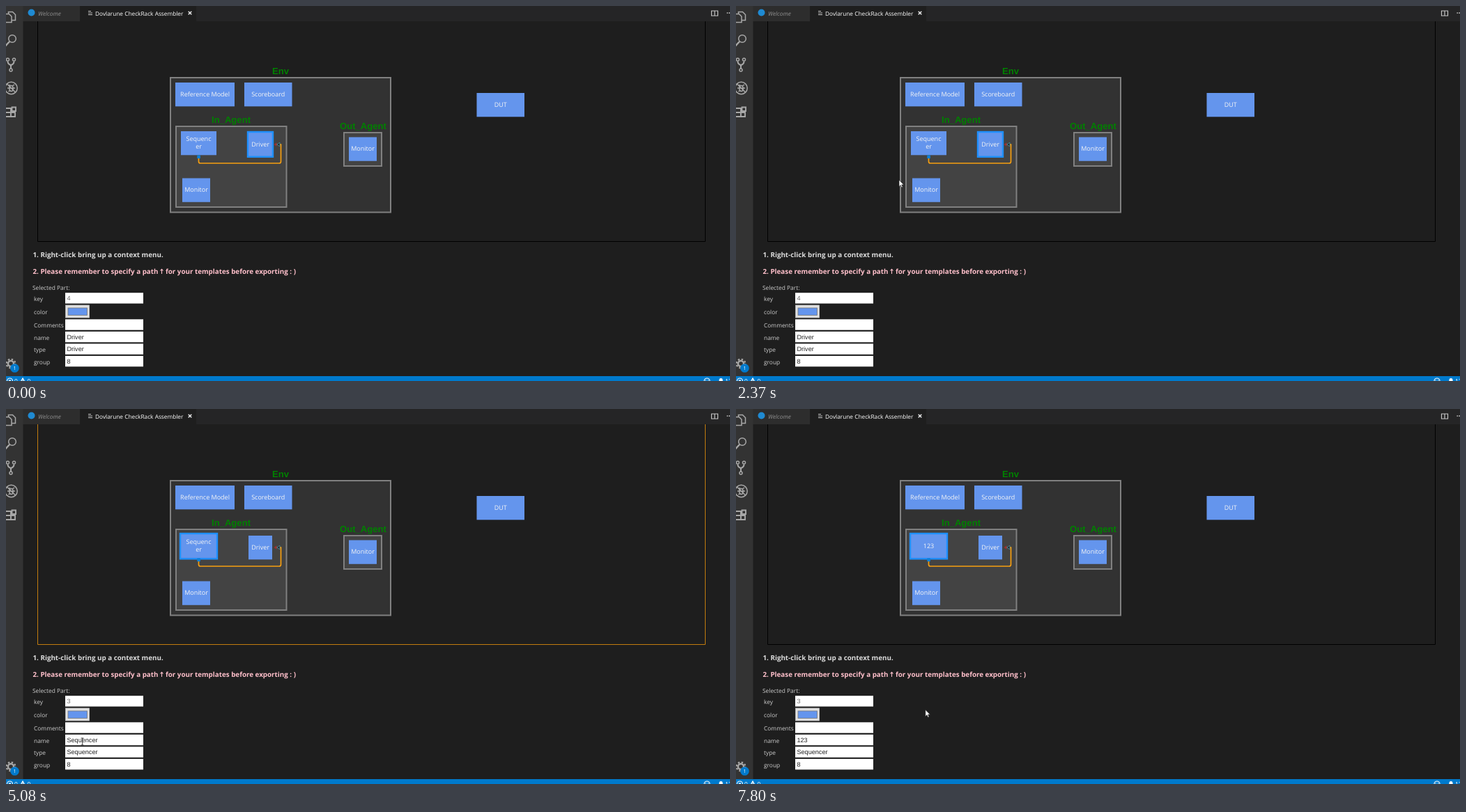
Recreate the animation shown at these times as an HTML page. Size 1039x539 px, loop 8000 ms.

```html
<!DOCTYPE html>
<html lang="en">
<head>
<meta charset="utf-8">
<title>Testbench editor</title>
<style>
  html, body { margin: 0; width: 100%; height: 100%; overflow: hidden; background: #1e1e1e; }
  svg { display: block; width: 100vw; height: 100vh; }
  text { font-family: "Open Sans", "Noto Sans", sans-serif; font-size: 8.4px; fill: #ccc; text-rendering: geometricPrecision; white-space: pre; }
  .tab { font-size: 8.3px; }
  .head { font-size: 9.8px; font-weight: 700; fill: #dcdcdc; }
  .pink { fill: #ffc0cb; }
  .node { font-size: 9px; fill: #f5f5f5; text-anchor: middle; }
  .title { font: 700 13.1px "Liberation Sans", Arial, sans-serif; fill: green; }
  .value { font: 9.1px "Liberation Sans", Arial, sans-serif; fill: #222; }
  .group { stroke: #808080; stroke-width: 2; }
  .block { fill: #6495ed; }
  .icon { fill: none; stroke: #a8a8a8; stroke-width: 1.5; }
  .status { fill: none; stroke: #fff; stroke-width: 1.2; }
</style>
</head>
<body>
<svg viewBox="0 0 1039 539" preserveAspectRatio="none">
  <defs><clipPath id="selClip"><rect id="selArea" y="470" height="11"/></clipPath></defs>
  <rect width="1039" height="539" fill="#1e1e1e"/>

  <!-- tabs -->
  <rect x="24" width="1015" height="22" fill="#252526"/>
  <rect x="24" width="82" height="22" fill="#2d2d2d"/>
  <rect x="106" width="167" height="22" fill="#1e1e1e"/>
  <circle cx="36.5" cy="9.5" r="5" fill="#1f8ad2"/>
  <text class="tab" x="46" y="13.7" font-style="italic" style="fill:#8f8f8f">Welcome</text>
  <path d="M118 7.5h4M118 10h6M118 12.5h6" stroke="#c5c5c5"/>
  <text class="tab" x="128" y="13.7" style="fill:#fff">Dovlarune CheckRack Assembler</text>
  <path d="M261.7 7.7l4.6 4.6m0-4.6l-4.6 4.6" stroke="#f0f0f0" stroke-width="1.4"/>
  <path d="M1012.5 7v7h9V7zM1017 7v7M1012 7h10" fill="none" stroke="#c5c5c5" stroke-width="1.2"/>
  <path d="M1034.5 10h1.6m1.2 0h1.7" stroke="#c5c5c5" stroke-width="1.7"/>

  <!-- activity bar -->
  <rect width="24.5" height="532" fill="#333"/>
  <g class="icon">
    <path d="M3.5 11V8.500h6l4 4v8H8M-2 11.500h6.500l3.500 3.500v8.500h-10z"/>
    <circle cx="9" cy="47" r="5.300"/><path d="M5.200 51L-1 57.500" stroke-width="2.400"/>
    <circle cx="2.500" cy="77" r="2"/><circle cx="11.500" cy="77" r="2"/><circle cx="7" cy="92" r="2"/>
    <path d="M2.500 79.500q0 4 4.500 5.500q4.500-1.500 4.500-5.500M7 85v5" stroke-width="2"/>
    <circle cx="7.500" cy="118" r="8.700"/><path d="M1.500 112l12 12M2 118h11M3.500 123l3-2M12 113l-3 2M5 113l1 2"/>
    <ellipse cx="7.500" cy="118.500" rx="2.700" ry="4"/>
    <path d="M-1 147h8v12h-8M-1 153h14v6H6M8.500 145.500h5.500v5.500H8.500z" stroke-width="1.900"/>
    <circle cx="7" cy="514" r="4" stroke-width="2.400"/>
    <circle cx="7" cy="514" r="6.300" stroke-width="2.200" stroke-dasharray="2.470 2.470"/>
  </g>
  <circle cx="12.500" cy="520.500" r="6.300" fill="#007acc"/>
  <text x="12.500" y="523.200" text-anchor="middle" style="font-size:7px;fill:#fff">1</text>

  <!-- status bar -->
  <rect y="532" width="1039" height="7" fill="#007acc"/>
  <g class="status">
    <circle cx="5.500" cy="539" r="4"/><path d="M4 537.500l3 3m0-3l-3 3M24 535l-4.500 8h9zM24 537.500v3"/>
    <circle cx="1006" cy="539" r="4"/><path d="M1004.300 537.300v1.200m3.400-1.200v1.200"/>
    <path d="M1022.500 541q1.500-1 1.500-3q0-2.500 2-2.500t2 2.500q0 2 1.500 3z" fill="#fff"/>
  </g>
  <g style="--c:#fff"><text x="12" y="542" style="fill:#fff">0</text><text x="30.500" y="542" style="fill:#fff">0</text><text x="1032" y="542" style="fill:#fff">12</text></g>

  <!-- diagram -->
  <path id="frame" d="M45.500 22V338.500H1003.500V22" fill="none"/>
  <rect class="group" x="236" y="103" width="316" height="193.500" fill="#323232"/>
  <rect class="group" x="244" y="173" width="158.500" height="116" fill="#434343"/>
  <rect class="group" x="485" y="182" width="54" height="48" fill="#434343"/>
  <text class="title" x="382" y="98.300">Env</text>
  <text class="title" x="295" y="168.300">In_Agent</text>
  <text class="title" x="479" y="177.300">Out_Agent</text>
  <g id="nodes"></g>
  <rect id="pick" fill="none" stroke="#1e90ff" stroke-width="2.400"/>
  <path d="M276.500 217V223.500q0 2.500 2.500 2.500H392q2.500 0 2.500-2.500V199H390" fill="none" stroke="#f8a010" stroke-width="1.700"/>
  <rect x="274.300" y="214.500" width="4.600" height="4.600" fill="#0a80d8"/>
  <path d="M384.500 199l4-2.700v5.400z" fill="#a03030"/>
  <path d="M388.500 199l4.500-2.700v5.400z" fill="#222" stroke="#4d9aa8" stroke-width=".8"/>

  <!-- notes and form -->
  <text class="head" x="38.500" y="360.500">1. Right-click bring up a context menu.</text>
  <text class="head pink" y="385.200"><tspan x="38.500">2. Please remember to specify a path</tspan><tspan x="229">for your templates before exporting : )</tspan></text>
  <path d="M223.500 385V378.500M221.500 380.500l2-2.200l2 2.200" fill="none" stroke="#ffc0cb" stroke-width="1.100"/>
  <text x="38" y="408.300">Selected Part:</text>
  <g id="form"></g>
  <rect id="button" x="85.500" y="430" width="34" height="18" stroke="#bbb" stroke-width=".8"/>
  <rect x="89" y="434" width="27.500" height="10.500" fill="#6495ed" stroke="#777" stroke-width=".8"/>
  <rect id="focus" x="85.500" y="468.300" width="111" height="14.700" fill="none" stroke="#f0a020" stroke-width="1.200"/>
  <rect id="mark" y="470" height="11" fill="#3390ff"/>
  <text id="picked" class="value" x="87.500" y="478.600" clip-path="url(#selClip)" style="fill:#fff"></text>
  <path id="caret" d="M0 470.500v10" stroke="#222" stroke-width=".8"/>

  <path id="arrow" d="M0 0V9.600L2.200 7.500L3.700 10.900L5.300 10.200L3.800 6.900H6.800Z" fill="#fff" stroke="#111" stroke-width=".6"/>
  <path id="beam" d="M-2 -5H2M0 -5V5M-2 5H2" fill="none" stroke="#222" stroke-width=".8"/>
</svg>
<script>
const $ = id => document.getElementById(id);
const set = (el, attrs) => { for (const k in attrs) el.setAttribute(k, attrs[k]); };
const show = (el, on) => { el.style.display = on ? "" : "none"; };

// label, x, y, width
const nodes = [
  ["Reference Model", 243, 110, 85], ["Scoreboard", 342, 110, 68.5],
  ["", 251, 180, 51], ["Driver", 348, 182, 34], ["Monitor", 253, 247.5, 40],
  ["Monitor", 492, 188.5, 40], ["DUT", 675.5, 125, 68.5]
];
$("nodes").innerHTML = nodes.map(([label, x, y, w]) =>
  `<rect class="block" x="${x}" y="${y}" width="${w}" height="34.300"/>
   <text class="node" x="${x + w / 2}" y="${y + 19.6}">${label}</text>`).join("") +
  `<text class="node" id="seqTop" x="276.500" y="194">Sequenc</text>
   <text class="node" id="seqEnd" x="276.500" y="205">er</text>
   <text class="node" id="seqNew" x="276.500" y="199.600">123</text>`;

// label, label baseline, box top
const rows = [["key", 423.700, 412.200], ["Comments", 462, 450.300], ["name", 479.500, 467.900],
  ["type", 497, 485.400], ["group", 514.500, 502.900]];
$("form").innerHTML = `<text x="40" y="442.700">color</text>` + rows.map(([label, base, top]) =>
  `<text x="40" y="${base}">${label}</text>
   <rect x="85" y="${top}" width="112" height="15.400" fill="#fff"/>
   <text class="value" id="${label}" x="87.500" y="${top + 10.7}"></text>`).join("");
$("key").style.fill = "#6a6a6a";
$("group").textContent = "8";

// start, end, number of steps, then [step, x, y] points on the pointer path
const moves = [
  [130, 900, 11, [1, 965, 528], [4, 640, 420], [7, 300, 380], [9, 150, 395], [11, 111, 421]],
  [990, 1380, 6, [2, 113, 428], [6, 109, 443]],
  [1610, 1690, 2, [2, 104, 442]],
  [1840, 2610, 11, [5, 200, 300], [9, 268, 200], [11, 266, 198]],
  [3070, 3840, 11, [1, 253.5, 319.500], [4, 180, 400], [8, 111, 437], [11, 107, 436]],
  [3910, 4530, 8, [3, 108, 432.500], [5, 110, 422], [8, 117, 460.500]],
  [4700, 4850, 3, [3, 109.500, 478]],
  [5000, 5770, 11, [2, 109.500, 478], [6, 136, 477], [8, 136, 477], [11, 128, 476]],
  [5850, 6150, 5, [5, 72, 474.800]],
  [6320, 7100, 11, [6, 152, 469], [11, 150, 474]],
  [7170, 7800, 9, [3, 200, 452], [7, 271.800, 432.300], [9, 271.800, 432.300]]
];

function pointer(t) {
  let pos = [985, 560];
  for (const [from, to, n, ...path] of moves) {
    if (t < from) break;
    const step = Math.min(n, Math.floor((t - from) / (to - from) * (n - 1) + .001) + 1);
    let s0 = 0, [x0, y0] = pos;
    for (const [s, x, y] of path) {
      const p = Math.min(1, (step - s0) / (s - s0));
      pos = [x0 + (x - x0) * p, y0 + (y - y0) * p];
      if (step <= s) break;
      [s0, x0, y0] = [s, x, y];
    }
  }
  return pos;
}

const PICK = 2450, PRESS = 5460, RELEASE = 6150, TYPE = [6860, 6940, 7020], COMMIT = 7720;

function draw(t) {
  const [x, y] = pointer(t);
  const within = (l, top, r, b) => x >= l && x <= r && y >= top && y <= b;
  const beam = within(85, 450, 197, 466) || within(85, 467, 197, 483);
  set($("arrow"), { transform: `translate(${x} ${y})` });
  set($("beam"), { transform: `translate(${x} ${y})` });
  show($("arrow"), !beam);
  show($("beam"), beam);
  set($("button"), { fill: within(85, 430, 119, 448) ? "#f0f0f0" : "#e1e1e1" });

  const seq = t >= PICK, canvasFocus = seq && t < PRESS;
  set($("frame"), { stroke: canvasFocus ? "#c27c0e" : "#000" });
  set($("pick"), seq ? { x: 250, y: 179, width: 53, height: 36.3 } : { x: 347, y: 181, width: 36, height: 35.8 });

  const typed = TYPE.filter(k => t >= k).length;
  const part = seq ? "Sequencer" : "Driver";
  const name = typed ? "123".slice(0, typed) : part;
  $("key").textContent = seq ? "3" : "4";
  $("type").textContent = part;
  $("name").textContent = $("picked").textContent = name;

  const focus = t >= PRESS && t < COMMIT;
  show($("focus"), focus);
  const end = 87.5 + $("name").getComputedTextLength();
  let start = end;
  if (focus && !typed) {
    const edge = t >= RELEASE ? 0 : x;
    for (let i = name.length - 1; i >= 0; i--) {
      const { x: left } = $("name").getStartPositionOfChar(i);
      if (edge < left + 2) start = left;
    }
  }
  set($("mark"), { x: start, width: end - start });
  set($("selArea"), { x: start, width: end - start });
  show($("caret"), focus && start === end);
  set($("caret"), { transform: `translate(${end + .4} 0)` });

  const renamed = t >= COMMIT;
  show($("seqTop"), !renamed);
  show($("seqEnd"), !renamed);
  show($("seqNew"), renamed);
}

(function loop() {
  draw(performance.now() % 8000);
  requestAnimationFrame(loop);
})();
</script>
</body>
</html>
```
